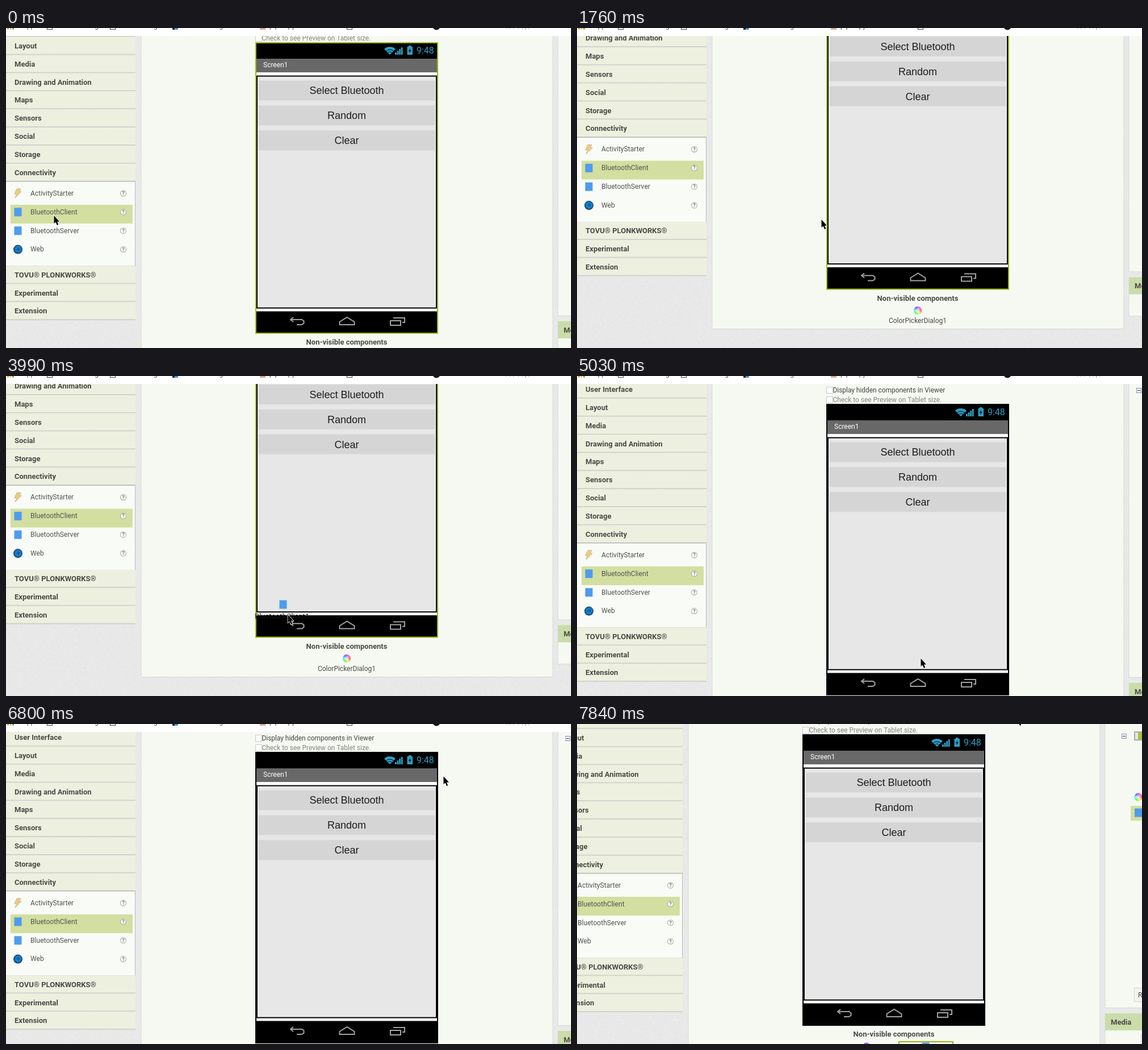
Animation of 995 by 563 pixels, one loop 7990 ms. Source, as an HTML page with a canvas:

```html
<!DOCTYPE html>
<html lang="en">
<head>
<meta charset="utf-8">
<title>App designer</title>
<style>
html, body { margin: 0; width: 100%; height: 100%; overflow: hidden; background: #e8e8e8; }
canvas { display: block; }
</style>
</head>
<body>
<canvas id="stage" width="995" height="563"></canvas>
<script>
const ctx = document.getElementById('stage').getContext('2d');
const LOOP = 7990, STEPS = 54, DROP = 30, GRAB = 22, BOTTOM = 101.5;
const ROW = 31.85, INK = '#4a4a46', GREEN = '#9ab50f', BLUE = '#4f9cec', PANEL = '#f6f9f1';
const CYAN = '#2d9fc4', HIGHLIGHT = '#d2dfa0';

const smooth = u => u * u * (3 - 2 * u);
const coast = u => 1 - (1 - u) ** 2.75;

// Each leg moves from wherever the last one ended: { from step, to step, target }
const leg = (from, to, ...target) => ({ from, to, target });
const scrolling = [leg(0, 8, BOTTOM), leg(DROP, 34, 0), leg(35, 39, BOTTOM), leg(39, 44, 0)];
const pointing = [leg(0, 8, 112, 300), leg(8, 12, 430, 337), leg(13, 15, 544, 402), leg(16, 17, 136, 246),
  leg(18, 19, 78, 242), leg(21, 27, 496, 420), leg(27, 29, 612, 480), leg(29, 34, 605, 497),
  leg(35, 42, 585, 503), leg(43, 46, 770, 92), leg(46, 50, 816, 17)];
const panning = [leg(51, 53, 42, 31)];

function follow(start, legs, step, ease) {
  return legs.reduce((pose, { from, to, target }) => {
    const u = ease(Math.min(1, Math.max(0, (step - from) / (to - from))));
    return pose.map((v, i) => v + (target[i] - v) * u);
  }, start);
}

function rect(x, y, w, h, color) {
  ctx.fillStyle = color;
  ctx.fillRect(x, y, w, h);
}
function frame(x, y, w, h, color, width = 1) {
  ctx.strokeStyle = color;
  ctx.lineWidth = width;
  ctx.strokeRect(x + width / 2, y + width / 2, w - width, h - width);
}
function panel(x, y, w, h, fill = PANEL) {
  rect(x, y, w, h, fill);
  frame(x, y, w, h, '#d4d5d1');
}
// The text is centred vertically on y
function text(str, x, y, size, color = INK, { bold, align = 'left', family = 'Roboto' } = {}) {
  ctx.font = `${bold ? 'bold ' : ''}${size}px ${family}, sans-serif`;
  ctx.textAlign = align;
  ctx.fillStyle = color;
  ctx.fillText(str, x, y + size * 0.36);
}
function path(points, { fill, stroke, width = 1, close = true }) {
  ctx.beginPath();
  points.forEach(([x, y]) => ctx.lineTo(x, y));
  if (close) ctx.closePath();
  ctx.lineWidth = width;
  if (stroke) { ctx.strokeStyle = stroke; ctx.stroke(); }
  if (fill) { ctx.fillStyle = fill; ctx.fill(); }
}
function disc(x, y, r, fill) {
  ctx.beginPath();
  ctx.arc(x, y, r, 0, 7);
  ctx.fillStyle = fill;
  ctx.fill();
}
function at(x, y, draw) {
  ctx.save();
  ctx.translate(x, y);
  draw();
  ctx.restore();
}

function makeSpeckle(size = 96) {
  const tile = document.createElement('canvas');
  tile.width = tile.height = size;
  const t = tile.getContext('2d');
  let seed = 7;
  for (let i = 0; i < size * size; i++) {
    seed = (seed * 16807) % 2147483647;
    const v = 229 + seed % 8;
    t.fillStyle = `rgb(${v},${v},${v})`;
    t.fillRect(i % size, Math.floor(i / size), 1, 1);
  }
  return ctx.createPattern(tile, 'repeat');
}
const speckle = makeSpeckle();

function blueSquare(x, y) { rect(x - 6.5, y - 7.5, 13, 15, BLUE); }
function colorWheel(x, y) {
  const hues = ctx.createConicGradient(0, x, y);
  for (let i = 0; i <= 6; i++) hues.addColorStop(i / 6, `hsl(${i * 60}, 90%, 62%)`);
  disc(x, y, 7, hues);
  const glow = ctx.createRadialGradient(x, y, 0, x, y, 7);
  glow.addColorStop(0, 'rgba(255,255,255,.9)');
  glow.addColorStop(1, 'rgba(255,255,255,0)');
  disc(x, y, 7, glow);
}
function lightning(x, y) {
  at(x, y, () => path([[-2, -8], [5, -8], [2, -3], [6, -3], [-5, 8], [-2, 1], [-6, 1]],
    { fill: '#eccb82', stroke: '#a99a7c' }));
}
function globe(x, y) {
  const g = ctx.createRadialGradient(x + 1, y - 1, 0, x, y, 8);
  g.addColorStop(0, '#0d4f94');
  g.addColorStop(0.55, '#1a86d2');
  g.addColorStop(1, '#123d66');
  disc(x, y, 8, g);
}
function helpMark(x, y) {
  disc(x, y, 5.5, '#a0a29d');
  disc(x, y, 4.6, '#fafbf7');
  text('?', x, y, 8.5, '#777', { bold: true, align: 'center' });
}
function collapseBox(x, y) {
  rect(x - 4.5, y - 4.5, 9, 9, '#eef0f6');
  frame(x - 4.5, y - 4.5, 9, 9, '#8c96b4');
  rect(x - 2.5, y - 0.5, 5, 1, '#34487c');
}

function paletteRows(labels, top) {
  labels.forEach((label, i) => {
    const y = top + i * ROW;
    rect(0, y, 228, ROW, '#edf0df');
    rect(0, y + ROW - 2, 228, 2, '#d0d2cb');
    text(label, 15, y + 15.4, 13, INK, { bold: true });
  });
}
function palette() {
  paletteRows(['User Interface', 'Layout', 'Media', 'Drawing and Animation', 'Maps', 'Sensors', 'Social',
    'Storage', 'Connectivity'], 8);
  rect(0, 293, 228, 150, '#b9bab8');
  rect(0, 294.5, 227, 148, '#f9fbf6');
  rect(8, 335, 215, 33, HIGHLIGHT);
  const items = [['ActivityStarter', lightning], ['BluetoothClient', blueSquare], ['BluetoothServer', blueSquare],
    ['Web', globe]];
  items.forEach(([label, icon], i) => {
    const y = 314.5 + i * 32.85;
    icon(21, y + 0.5);
    text(label, 43, y, 12.1, '#535350');
    helpMark(206.5, y + 0.5);
  });
  paletteRows(['TOVU® PLONKWORKS®', 'Experimental', 'Extension'], 442.6);
}

function statusIcons() {
  ctx.fillStyle = CYAN;
  ctx.beginPath();
  ctx.moveTo(676, 71);
  ctx.arc(676, 71, 14, -2.36, -0.78);
  ctx.fill();
  ctx.strokeStyle = '#000';
  ctx.lineWidth = 1;
  for (const r of [5, 9]) {
    ctx.beginPath();
    ctx.arc(676, 71, r, -2.4, -0.74);
    ctx.stroke();
  }
  for (let i = 0; i < 4; i++) rect(685 + i * 3.6, 67 - i * 3, 2.8, 4 + i * 3, CYAN);
  rect(706.5, 57, 9.5, 14, CYAN);
  rect(709, 55, 4.5, 2, CYAN);
  path([[712, 59], [708.5, 65], [711, 65], [710, 69], [714, 63], [711.5, 63]], { fill: '#041820' });
  text('9:48', 723, 63.5, 16, CYAN);
}
function navIcons() {
  const gray = '#a2a2a2', line = { stroke: gray, width: 2, close: false };
  at(513, 540, () => {
    path([[-7, -7], [-12, -3], [-7, 1]], line);
    path([[-12, -3], [8, -3], [11.5, -0.5], [11.5, 3.5], [8, 6], [-1, 6]], line);
  });
  at(600.5, 540, () => path([[-13, 1], [0, -7], [13, 1], [13, 6], [-13, 6]], { ...line, close: true }));
  at(689, 540, () => {
    frame(-13, -2, 20, 10, gray, 2);
    path([[-7, -6], [13, -6], [13, 2], [9, 2]], line);
  });
}
function phone(selected) {
  rect(439, 49, 322, 513, selected ? GREEN : '#000');
  rect(441, 51, 318, 509, '#000');
  statusIcons();
  rect(441, 78, 318, 24, '#686868');
  text('Screen1', 453, 89, 12, '#fff');
  rect(441, 102, 318, 420.5, '#fbfbfa');
  rect(441, 107.6, 318, 410, '#000');
  rect(443, 109.6, 314, 406, '#f3f3f3');
  rect(444, 110.6, 312, 404, '#e7e7e7');
  ['Select Bluetooth', 'Random', 'Clear'].forEach((label, i) => {
    const y = 117 + i * 43.8;
    rect(444, y - 1, 312, 36, '#dfdfdf');
    rect(445, y, 310, 34, '#d5d5d5');
    text(label, 600, y + 17, 18, '#1c1c1c', { align: 'center', family: '"Liberation Sans"' });
  });
  navIcons();
}

function hiddenComponents(dropped) {
  text('Non-visible components', 600, 576.5, 13, INK, { bold: true, align: 'center' });
  const x = dropped ? 552 : 600;
  colorWheel(x, 598.5);
  text('ColorPickerDialog1', x, 616.5, 12, INK, { align: 'center' });
  if (!dropped) return;
  frame(608, 589, 97, 38, GREEN, 2);
  blueSquare(656, 599);
  text('BluetoothClient1', 656, 616.5, 12, INK, { align: 'center' });
}
function checkbox(label, y, color) {
  rect(439, y - 6, 12, 12, '#fff');
  frame(439, y - 6, 12, 12, '#c9cac6');
  text(label, 450.5, y, 11.9, color);
}
function viewer(dropped) {
  panel(237.5, -60, 726, 691.5);
  checkbox('Display hidden components in Viewer', 25, '#444');
  checkbox('Check to see Preview on Tablet size.', 42, '#858683');
  phone(!dropped);
  hiddenComponents(dropped);
}

function componentTree(dropped) {
  panel(971.5, -60, 200, 591);
  collapseBox(989.5, 25.5);
  frame(1010, 20, 10, 10, '#999');
  text('Screen1', 1024, 25, 12);
  collapseBox(1005.5, 52.5);
  rect(1023, 44, 16, 16, '#aaa');
  rect(1025, 46, 5, 12, '#e4e8dc');
  rect(1031, 46, 8, 12, '#a6c62c');
  colorWheel(1030.5, 159.5);
  if (dropped) {
    rect(1017, 175, 100, 26, HIGHLIGHT);
    blueSquare(1030.5, 187);
  }
  panel(1023, 495, 70, 25, '#f3f3f1');
  text('Rename', 1030, 507.5, 12);
  panel(971.5, 540, 200, 69);
  rect(972, 540, 200, 30, '#cbdcab');
  text('Media', 982, 555, 13, INK, { bold: true });
  panel(1035, 577, 80, 20, '#fff');
}

// Only the lowest pixels of the bookmark bar show
function bookmarks() {
  rect(0, 0, 995, 14, '#fff');
  ['#e0a03a', '#d8c040', '#79a857'].forEach((color, i) => rect(2 + i * 4.5, 0, 3, 2.5, color));
  ['Apps', 'Design', 'Design', 'Catalog'].forEach((word, i) => text(word, 29 + i * 104, -4, 12, '#555'));
  text('pip copy', 464, -4, 12, '#555');
  for (const x of [72, 183, 600]) frame(x, -8, 10, 11, '#444');
  rect(293, 0, 4, 3, '#222');
  rect(297, 0, 6, 3, '#3d9be0');
  rect(447, 0, 10, 3, '#dca88e');
  disc(758, -3, 6.5, '#151515');
  text('. . .  . . , .', 880, -3, 12, '#888');
}

function dragGhost(x, y) {
  blueSquare(x - 8, y - 18);
  text('BluetoothClient1', x - 58, y + 2.5, 13, '#151515');
}
function pointer(x, y) {
  at(x, y, () => path([[0.5, 0], [0.5, 14], [3.6, 11.4], [6, 17], [8.3, 16], [6, 10.8], [10, 10.6]],
    { fill: '#000', stroke: '#fff', width: 1.5 }));
}

function draw(now) {
  const step = Math.min(STEPS - 1, Math.floor((now % LOOP + 18) / LOOP * STEPS));
  const [scroll] = follow([24], scrolling, step, coast);
  const [x, y] = follow([84, 330], pointing, step, smooth);
  const [panX, panY] = follow([0, 0], panning, step, smooth);
  const dropped = step >= DROP;
  at(-panX, -panY, () => {
    ctx.save();
    ctx.beginPath();
    ctx.rect(0, 14, 1100, 620);
    ctx.clip();
    ctx.translate(0, -scroll);
    rect(0, 0, 1100, 720, speckle);
    palette();
    viewer(dropped);
    componentTree(dropped);
    ctx.restore();
    bookmarks();
    if (step >= GRAB && !dropped) dragGhost(x, y);
    pointer(x, y);
  });
}

const start = performance.now();
function tick() {
  draw(performance.now() - start);
  requestAnimationFrame(tick);
}
tick();
</script>
</body>
</html>
```
